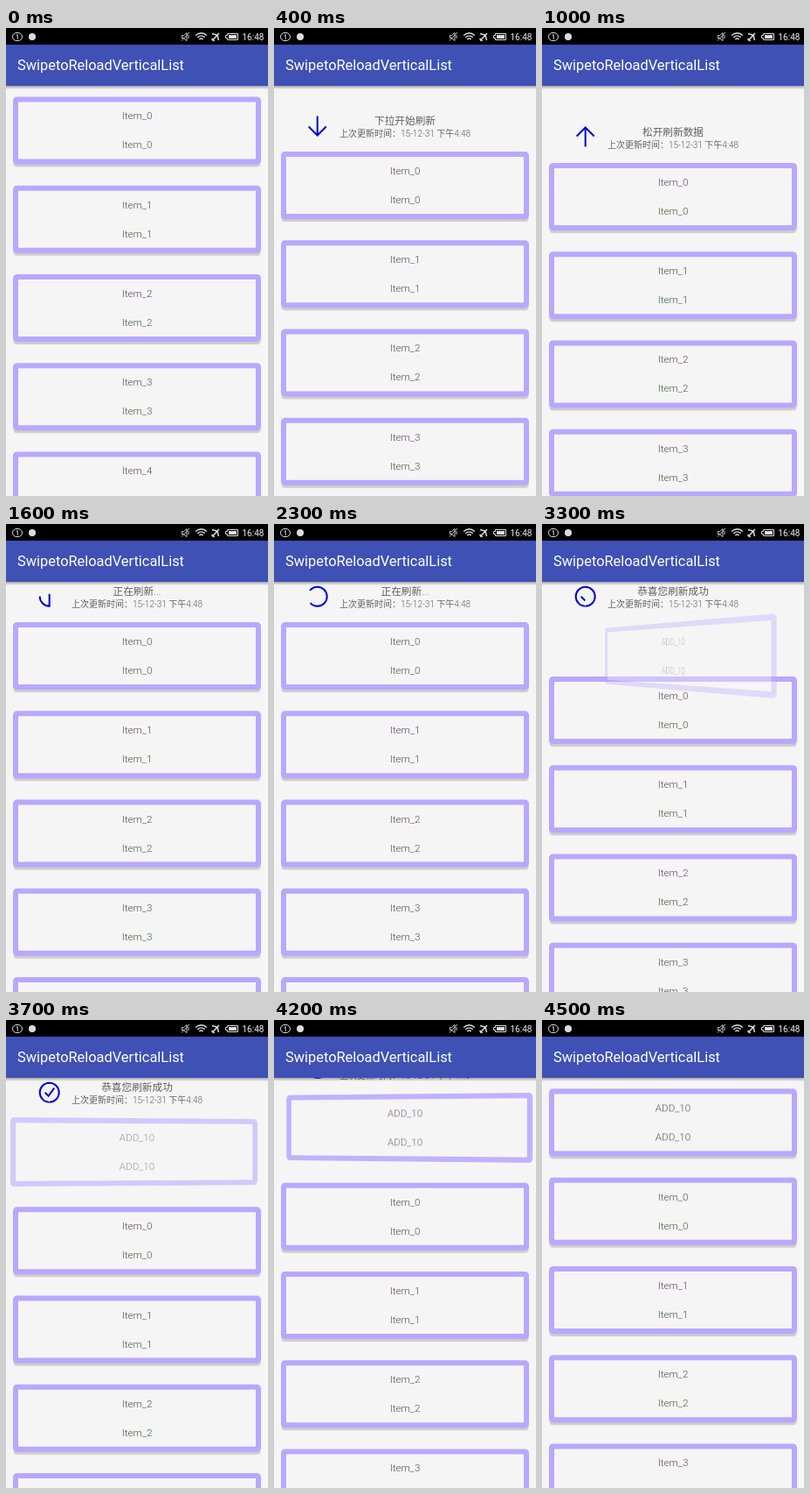
Recreate the animation shown at these times as an HTML page. Size 300x534 px, loop 4600 ms.

```html
<!DOCTYPE html>
<html lang="zh-CN">
<head>
<meta charset="utf-8">
<style>
html, body { margin: 0; width: 100%; height: 100%; overflow: hidden; background: #f5f5f5; }
body { position: relative; font-family: Roboto, "Noto Sans CJK SC", "Noto Sans CJK", sans-serif; }
svg, #bar, #head, .card { position: absolute; left: 0; top: 0; }
#bar { width: 300px; height: 66px; background: linear-gradient(#000 19px, #3f51b5 19px); z-index: 2; }
#bar::after { content: ""; position: absolute; top: 66px; width: 300px; height: 4px;
  background: linear-gradient(#0005, #0000); }
#title { position: absolute; left: 13px; top: 19px; line-height: 48px; font-size: 16.4px; color: #fff; white-space: nowrap; }
#head { width: 300px; text-align: center; font-weight: 300; color: #606060; white-space: nowrap; }
#head div { position: absolute; width: 300px; line-height: 16px; }
#state { top: 34.5px; font-size: 11.67px; }
#time { top: 49.5px; font-size: 10px; }
#head svg { left: 35px; top: 34px; }
.card { left: 8px; width: 284px; height: 77px; box-sizing: border-box; padding-top: .3px;
  border: 6px solid #b8a8ff; border-radius: 4.5px; background: #f5f5f5;
  text-align: center; font-size: 11.67px; font-weight: 300; line-height: 32.5px; color: #5a4c5e;
  box-shadow: 0 3.5px 1px -.5px #ccc; }
.card div + div { color: #46603f; }
</style>
</head>
<body>
<div id="head">
  <svg width="30" height="30" viewBox="-14.7 -15 30 30" fill="none" stroke="#0000d8" stroke-width="2">
    <path id="arrow" d="M0-11V11M-10 1L0 11L10 1"/>
    <path id="ring"/>
    <path id="tick" d="M-5 0L-1 4L5.5-5"/>
  </svg>
  <div id="state"></div>
  <div id="time">上次更新时间：15-12-31 下午4:48</div>
</div>
<div id="bar">
  <svg width="300" height="19" fill="none" stroke="#ddd">
    <rect x="7.5" y="5.5" width="11" height="9" rx="4.5"/>
    <path d="M11.8 8.5L13.2 7.5V13"/>
    <circle cx="30" cy="10" r="4" fill="#ddd" stroke="none"/>
    <path d="M201.5 8.5H203.5L207 5.5V14.5L203.5 11.5H201.5ZM201 14.5L210 5M209 8V12" stroke-width=".9"/>
    <path d="M217 8.5Q223.5 3 230 8.5M219.2 10.8Q223.5 7 227.8 10.8M221.3 13Q223.5 11 225.7 13" stroke-width="1.3"/>
    <path d="M236 14.5L244 6M236 6.5L242 8L243.5 14M235.5 12L238.5 15" stroke-width="1.5"/>
    <path d="M253.5 6.5H265.5V13.5H253.5V11.5H251.5V8.5H253.5Z"/>
    <rect x="255" y="8" width="9" height="4" fill="#ddd" stroke="none"/>
    <text x="270.5" y="13.6" font-size="10" fill="#eee" stroke="none">16:48</text>
  </svg>
  <div id="title">SwipetoReloadVerticalList</div>
</div>
<script>
const LOOP = 4600, TOP = 78.4, PITCH = 101.25;
const $ = id => document.getElementById(id);

// Piecewise linear value from [time, value] pairs
function track(t, keys) {
  let i = 1;
  while (i < keys.length - 1 && t > keys[i][0]) i++;
  const [t0, a] = keys[i - 1], [t1, b] = keys[i];
  const u = Math.min(1, Math.max(0, (t - t0) / (t1 - t0)));
  return a + (b - a) * u;
}

const ease = u => (1 - Math.cos(Math.PI * u)) / 2;

function card(label) {
  const el = document.createElement('div');
  el.className = 'card';
  el.innerHTML = `<div>${label}</div><div>${label}</div>`;
  return document.body.appendChild(el);
}

const items = [0, 1, 2, 3, 4].map(i => card('Item_' + i));
const added = card('ADD_10');

const turn = 'A11 11 0 0 1 0-11A11 11 0 0 1 0 11';
$('ring').setAttribute('d', 'M0-11V11' + turn.repeat(2));

const pull = [[100, 0], [200, 16], [300, 44], [400, 62.5], [500, 67.5], [700, 72.5], [1000, 75.5],
  [1100, 75.5], [1200, 76], [1300, 76], [1400, 66], [1500, 46], [1600, 33.7],
  [3800, 33.7], [3900, 28], [4000, 20], [4100, 12], [4200, 6], [4300, 2], [4400, 0]];
const FLIP = 3130, LEG = 430;
const legs = values => values.map((v, i) => [FLIP + i * LEG, v]);

function draw(t) {
  const off = track(t, pull);
  $('head').style.transform = `translateY(${off}px)`;
  $('state').textContent = t < 500 ? '下拉开始刷新' : t < 1400 ? '松开刷新数据' :
    t < 2700 ? '正在刷新...' : '恭喜您刷新成功';

  const busy = t >= 1400;
  $('arrow').style.display = busy ? 'none' : '';
  $('arrow').setAttribute('transform', `rotate(${track(t, [[500, 0], [700, 180]])})`);

  // The shaft runs into the ring, whose head slowly catches its tail
  const u = track(t, [[1400, 0], [3000, 1]]), lap = 22 * Math.PI;
  const head = 22 + 2 * lap * u, tail = (22 + lap) * u ** 1.17;
  $('ring').style.display = busy ? '' : 'none';
  $('ring').setAttribute('stroke-dasharray', `0 ${tail} ${head - tail} 999`);

  const k = track(t, [[3150, 0], [3550, 1]]);
  $('tick').style.display = k ? '' : 'none';
  $('tick').setAttribute('stroke-dasharray', `${17 * k} 99`);

  const shift = ease(track(t, [[3100, 0], [3450, 1]]));
  items.forEach((el, i) => {
    el.style.transform = `translateY(${TOP + off + (i + shift) * PITCH}px)`;
  });

  const angle = track(t, legs([-90, 15, -15, 0]));
  const alpha = track(t, legs([.25, .5, .75, 1]));
  added.style.display = t > FLIP ? '' : 'none';
  added.style.opacity = alpha;
  added.style.boxShadow = alpha < 1 ? 'none' : '';
  added.style.transform = `translateY(${TOP + off}px) perspective(512px) rotateY(${angle}deg)`;
}

// The screen is refreshed ten times a second
function frame() {
  draw(Math.floor(performance.now() % LOOP / 100) * 100);
  requestAnimationFrame(frame);
}
frame();
</script>
</body>
</html>
```
